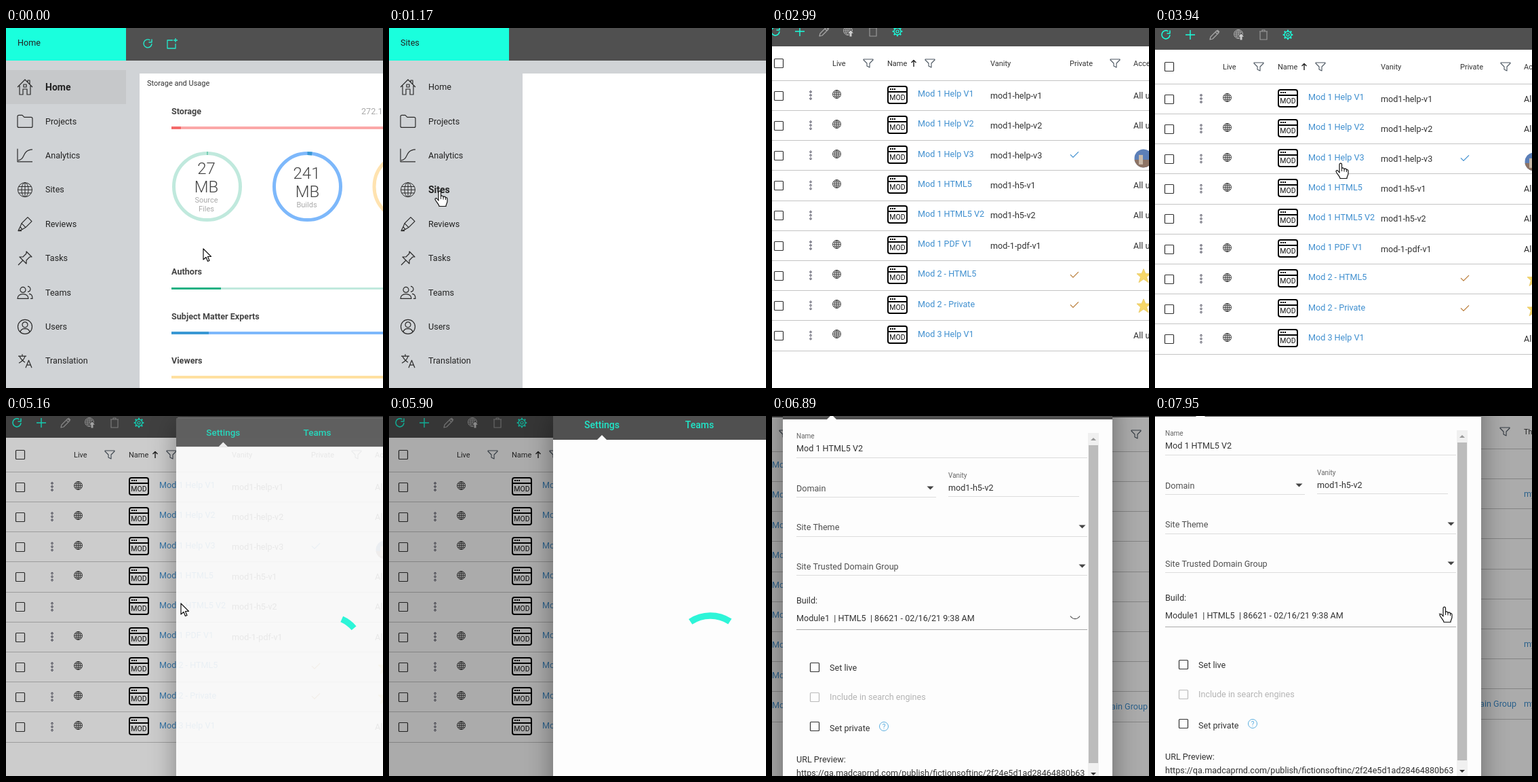
An HTML page with a canvas that plays this animation: 556 px wide and 530 px high, repeating every 8000 ms.

```html
<!DOCTYPE html>
<html lang="en">
<head>
<meta charset="utf-8">
<title>Site management</title>
<style>
html, body { margin: 0; width: 100%; height: 100%; overflow: hidden; background: #fff; }
canvas { display: block; }
</style>
</head>
<body>
<canvas id="stage" width="556" height="530"></canvas>
<script>
const ctx = document.getElementById('stage').getContext('2d');
const W = 556, H = 530, LOOP = 8000, TAU = Math.PI * 2;
const TEAL = '#1affdd', BAR = '#505050', INK = '#333', LINK = '#3f8fcf';

// The screen only refreshes at these times (ms).
const STEPS = [0, 130, 260, 410, 530, 650, 780, 900, 1050, 1170, 1290, 1440, 1570, 1700,
  1820, 1950, 2470, 2600, 2730, 2870, 2990, 3130, 3250, 3400, 3550, 3800, 3940, 4070,
  4190, 4320, 4450, 4570, 4890, 5160, 5280, 5420, 5540, 5660, 5780, 5900, 6020, 6170,
  6390, 6530, 6650, 6770, 6890, 7010, 7540, 7700, 7820, 7950];

const CAMERA = [[2470, 0, 0], [2730, 130, 51], [2870, 190, 74], [2990, 215, 84],
  [3130, 211, 82], [3550, 204, 79], [6390, 204, 79], [6530, 268, 84], [6650, 334, 91],
  [6770, 390, 101], [6890, 430, 109], [7010, 451, 113]];

const POINTER = [[0, 291, 325], [260, 217, 291], [900, 75, 240], [1290, 75, 240],
  [1950, 277, -17], [2600, 277, -17], [3800, 279, 101], [3940, 274, 199], [4070, 284, 250],
  [4190, 262, 305], [4320, 215, 300], [4450, 240, 282], [4570, 258, 275], [4890, 258, 276],
  [5420, 258, 276], [7540, 423, 139], [7700, 427, 190], [7820, 431, 245], [7950, 427, 281]];

function at(keys, t) {
  let i = keys.findIndex(k => k[0] > t);
  if (i < 0) return keys[keys.length - 1].slice(1);
  if (i === 0) return keys[0].slice(1);
  const a = keys[i - 1], b = keys[i], u = (t - a[0]) / (b[0] - a[0]);
  return [a[1] + (b[1] - a[1]) * u, a[2] + (b[2] - a[2]) * u];
}

function rect(x, y, w, h, color) {
  ctx.fillStyle = color;
  ctx.fillRect(x, y, w, h);
}

// y is the visual middle of the line; the baseline snaps to whole pixels.
function text(str, x, y, { size = 12.6, color = INK, weight = 400, align = 'left' } = {}) {
  ctx.font = `${weight} ${size}px Roboto, sans-serif`;
  ctx.fillStyle = color;
  ctx.textAlign = align;
  ctx.fillText(str, x, Math.round(y + size * 0.355 - 0.8));
}

function icon(d, x, y, color = '#2b2b2b', width = 1.2, fill) {
  ctx.save();
  ctx.translate(x, y);
  const path = new Path2D(d);
  if (fill) { ctx.fillStyle = fill; ctx.fill(path); }
  ctx.strokeStyle = color;
  ctx.lineWidth = width;
  ctx.lineJoin = 'round';
  if (width) ctx.stroke(path);
  ctx.restore();
}

function ring(x, y, r, color, width, from = 0, sweep = TAU) {
  ctx.beginPath();
  ctx.arc(x, y, r, from, from + sweep);
  ctx.strokeStyle = color;
  ctx.lineWidth = width;
  ctx.stroke();
}

function globe(x, y, r, color, width) {
  ring(x, y, r, color, width);
  ctx.beginPath();
  ctx.ellipse(x, y, r * 0.48, r, 0, 0, TAU);
  for (const k of [-0.45, 0, 0.45]) {
    const half = r * Math.sqrt(1 - k * k);
    ctx.moveTo(x - half, y + k * r);
    ctx.lineTo(x + half, y + k * r);
  }
  ctx.moveTo(x, y - r);
  ctx.lineTo(x, y + r);
  ctx.stroke();
}

function checkbox(x, y, color = '#333') {
  ctx.strokeStyle = color;
  ctx.lineWidth = 1.2;
  ctx.beginPath();
  ctx.roundRect(x - 6.5, Math.round(y) - 6.5, 13, 13, 1);
  ctx.stroke();
}

const SHAPES = {
  home: 'M-11 0L0-11 11 0M-8-2V11H-3V3H3V11H8V-2M4-7V-10H7V-4M-2-4H2V0H-2Z',
  folder: 'M-11-7a2 2 0 0 1 2-2H-4l3 3H9a2 2 0 0 1 2 2V7a2 2 0 0 1-2 2H-9a2 2 0 0 1-2-2Z',
  chart: 'M-11-10V9H11M-10 7C1 6-5-8 11-9',
  pen: 'M-10 10L-7 4-5-1 4-10 10-4 1 5-4 8ZM-5-1L1 5M-7 4L-4 8M-10 10H-5',
  pin: 'M2-10L10-2 7-2 2 3 2 8-8-2-3-2 2-7ZM-3 3L-10 10',
  people: 'M-7-4a4 4 0 1 0 8 0a4 4 0 1 0-8 0M-11 9C-11 0 5 0 5 9ZM4-9a4 4 0 1 1 0 8M6 2C10 2 11 5 11 9H8',
  user: 'M-10.5 0a10.5 10.5 0 1 0 21 0a10.5 10.5 0 1 0-21 0M-4-3a4 4 0 1 0 8 0a4 4 0 1 0-8 0M-7 8C-6 1 6 1 7 8',
  translate: 'M-10-7H2M-4-10V-7M0-7C-1-2-5 1-9 3M-8-7C-6-2-3 0 0 2M1 10L5.5-1 10 10M2.5 6H8.5',
  refresh: 'M6 0A6 6 0 1 1 3.5-5M6-6.5V-2H1.5',
  plus: 'M-7 0H7M0-7V7',
  boxPlus: 'M1-5H-7V7H5V0M5-8V-2M2-5H8',
  pencil: 'M-7 7L-6 3 3-6 6-3-3 6ZM1-4L4-1M4-7L7-4',
  trash: 'M-6-5H6M-2-5V-7H2V-5M-5-5V7H5V-5',
  filter: 'M-7-6H7V-5L2 0V6L-2 4V0L-7-5Z',
  up: 'M0 5V-4M-3.5-1L0-4.5 3.5-1',
  check: 'M-6 0L-2 4 6-4',
  star: 'M0-10L3-3 10-3 4.5 2 7 10 0 5-7 10-4.5 2-10-3-3-3Z',
  caret: 'M-5-2.5H5L0 2.5Z',
  chevron: 'M-7-2.5C-3 3 3 3 7-2.5',
  arrow: 'M0 0V16L4 12.5 6.5 18.5 9 17.5 6.5 11.5H11.5Z',
  hand: 'M-2 2C-2-.5 1.5-.5 1.5 2V8C2 6.5 5 6.5 5 9C6 7.5 8.5 8 8.5 10C9.5 9 11 9.5 11 12V15C11 18 9 19 9 22.5H-1C-1 20-7 14-7 12C-7 10.5-5 10-4 11.5L-2 14Z'
};

const MENU = [['Home', 'home'], ['Projects', 'folder'], ['Analytics', 'chart'], ['Sites'],
  ['Reviews', 'pen'], ['Tasks', 'pin'], ['Teams', 'people'], ['Users', 'user'],
  ['Translation', 'translate']];

function sidebar(active) {
  rect(0, 0, 177, 48, TEAL);
  text(active, 17, 22.5, { color: '#222' });
  if (active === 'Home') rect(0, 62, 177, 50, '#c6c8ca');
  MENU.forEach(([name, shape], i) => {
    const y = 87 + i * 50.4, on = name === active;
    if (shape) icon(SHAPES[shape], 28, y);
    else globe(28, y, 10.5, '#2b2b2b', 1);
    text(name, 58, y + 0.5, { color: '#222', weight: on ? 700 : 400, size: on ? 14 : 12.6 });
  });
}

function meter(label, y, barY, h, base, tone, part) {
  text(label, 244, y, { weight: 700, color: '#444' });
  rect(244, barY, 400, h, base);
  rect(244, barY, part, h, tone);
}

function dial(x, lines, caption, base, tone, sweep) {
  const y = 233.5;
  ring(x, y, 49, base, 5);
  ring(x, y, 49, tone, 5, -TAU / 4, sweep);
  const top = caption.length > 1 ? 207 : 214;
  lines.forEach((s, i) => text(s, x - 1 + (caption.length > 1 ? 0 : i), top + i * 27,
    { size: 24, weight: 300, color: '#444', align: 'center' }));
  caption.forEach((s, i) => text(s, x - 1, top + 47 + i * 13,
    { size: 11, color: '#aaa', align: 'center' }));
}

function dashboard() {
  text('Storage and Usage', 208, 81.5, { size: 11 });
  text('272.1 MB', 524, 123.5, { color: '#aaa' });
  meter('Storage', 123.5, 145, 4, '#fba8a8', '#f46a6a', 14);
  dial(296.5, ['27', 'MB'], ['Source', 'Files'], '#c0e9dd', '#2db58a', 0.02);
  dial(444.5, ['241', 'MB'], ['Builds'], '#7db8fb', '#3a98d4', 0.14);
  ring(592, 233.5, 49, '#ffe3b0', 5);
  meter('Authors', 359.5, 382, 3, '#c0e9dd', '#1fb183', 73);
  meter('Subject Matter Experts', 425.5, 447, 4, '#7db8fb', '#3a98d4', 55);
  meter('Viewers', 490.5, 512, 4, '#ffe0a0', '#ffe0a0', 0);
}

function siteTabs() {
  rect(191, 0, 61, 48, '#404040');
  [['Sites', 221.5], ['URLs', 282], ['Security', 352], ['Themes', 430]].forEach(([s, x]) =>
    text(s, x, 23.5, { weight: 500, color: '#23ecce', align: 'center' }));
  rect(207, 29, 29, 1, '#23ecce');
  icon('M-8 4L0-4 8 4Z', 221.5, 44, '', 0, '#d0d3d6');
}

function gear(x, y) {
  ring(x, y, 2, TEAL, 1.2);
  ring(x, y, 5, TEAL, 1.3);
  for (let i = 0; i < 8; i++) ring(x, y, 6.3, TEAL, 2, i * TAU / 8 - 0.16, 0.32);
}

function toolbar() {
  ctx.fillStyle = BAR;
  ctx.beginPath();
  ctx.roundRect(197, 67, 900, 44, [3, 0, 0, 0]);
  ctx.fill();
  icon(SHAPES.refresh, 220, 89, TEAL, 1.5);
  icon(SHAPES.plus, 256, 89, TEAL, 1.4);
  icon(SHAPES.pencil, 292, 89, '#aaa');
  globe(327, 88, 6.5, '#aaa', 1);
  icon('M0-5L5 0H2V5H-2V0H-5Z', 331, 92, BAR, 1, '#ccc');
  icon(SHAPES.trash, 364, 89, '#999');
  gear(400, 89);
}

const ROWS = [
  ['Mod 1 Help V1', 'mod1-help-v1'], ['Mod 1 Help V2', 'mod1-help-v2'],
  ['Mod 1 Help V3', 'mod1-help-v3'], ['Mod 1 HTML5', 'mod1-h5-v1'],
  ['Mod 1 HTML5 V2', 'mod1-h5-v2'], ['Mod 1 PDF V1', 'mod-1-pdf-v1'],
  ['Mod 2 - HTML5', ''], ['Mod 2 - Private', ''], ['Mod 3 Help V1', '']];

function modIcon(x, y) {
  ctx.strokeStyle = '#000';
  ctx.lineWidth = 2;
  ctx.beginPath();
  ctx.roundRect(x + 1, y + 1, 28, 25, 3);
  ctx.moveTo(x + 1, y + 9);
  ctx.lineTo(x + 29, y + 9);
  ctx.stroke();
  for (const dx of [4, 7, 10]) rect(x + dx, y + 4, 2, 2, '#000');
  text('MOD', x + 15, y + 18, { size: 10.5, color: '#111', align: 'center' });
}

function avatar(x, y) {
  ctx.save();
  ctx.beginPath();
  ctx.arc(x, y, 13.5, 0, TAU);
  ctx.clip();
  rect(x - 14, y - 14, 28, 28, '#5c7fb8');
  rect(x - 14, y + 2, 28, 12, '#8d7364');
  rect(x - 7, y - 5, 6, 14, '#c9b9a8');
  ctx.restore();
}

function row([name, vanity], i) {
  const y = 183.5 + i * 44.2;
  rect(197, Math.round(205 + i * 44.2), 900, 1, '#c4c4c4');
  checkbox(225, y);
  for (const dy of [-5, 0, 5]) ring(272, y - 0.5 + dy, 1.3, '#445', 1);
  if (i !== 4) globe(310.5, Math.round(y) - 2.5, 6, '#333', 0.9);
  modIcon(385, Math.round(y - 15));
  text(name, 430, y - 2, { color: LINK });
  text(vanity, 537, y + 0.5);
  if (i === 2) icon(SHAPES.check, 661, y - 1.5, '#3f8fcf');
  if (i === 6 || i === 7) {
    icon(SHAPES.check, 661, y - 1.5, '#b87a35');
    icon(SHAPES.star, 763, y, '#e8c860', 0.8, '#f7d768');
  } else if (i === 2) avatar(763, y + 4);
  else text('All users', 748, y + 0.5);
  if (i === 1 || i === 6 || i === 8) text('my-theme', 995, y + 0.5, { color: LINK });
  if (i === 8) text('Domain Group', 984, y + 0.5, { color: LINK, align: 'right' });
}

function table() {
  const head = { size: 11, color: '#333' };
  checkbox(225, 136);
  [['Live', 304], ['Name', 385], ['Vanity', 537], ['Private', 654], ['Access', 748],
    ['Theme', 995]].forEach(([s, x]) => text(s, x, 136.5, head));
  for (const x of [357, 448, 721, 967]) icon(SHAPES.filter, x, 136, '#4a5560', 1.1);
  icon(SHAPES.up, 424, 136, '#222', 1.4);
  rect(197, 161, 900, 1, '#c4c4c4');
  ROWS.forEach(row);
}

function page(t) {
  rect(0, 0, 1100, 900, '#d0d3d6');
  rect(177, 0, 923, 48, BAR);
  sidebar(t < 1050 ? 'Home' : 'Sites');
  rect(197, 67, 903, 833, '#fff');
  if (t < 1170) {
    icon(SHAPES.refresh, 209, 23, '#23ecce', 1.4);
    icon(SHAPES.boxPlus, 245, 23, '#23ecce', 1.3);
    dashboard();
  }
  if (t >= 1440) { siteTabs(); toolbar(); }
  if (t >= 1570) table();
}

const line = (x, y, w, color = '#dcdcdc') => rect(x, y, w, 1, color);
const caret = (x, y) => icon(SHAPES.caret, x, y, '', 0, '#444');

function form() {
  const small = { size: 10, color: '#666' }, soft = { color: '#505050' };
  text('Name', 132, 48.5, small);
  text('Mod 1 HTML5 V2', 132, 66);
  line(132, 79, 429);
  text('Domain', 132, 125, soft);
  caret(329.5, 124);
  line(132, 137, 206);
  text('Vanity', 356, 106.5, small);
  text('mod1-h5-v2', 356, 124);
  line(356, 136, 193);
  text('Site Theme', 132, 182, soft);
  caret(553.5, 181);
  line(132, 195, 429);
  text('Site Trusted Domain Group', 132, 240, soft);
  caret(553.5, 239);
  line(132, 252, 429);
  text('Build:', 132, 290);
  text('Module1\u00a0 | HTML5\u00a0 | 86621 - 02/16/21 9:38 AM', 132, 316);
  icon(SHAPES.chevron, 543, 315, '#444', 1.1);
  line(132, 332, 429, '#aaa');
  checkbox(159, 388);
  text('Set live', 181, 389);
  checkbox(159, 432, '#bbb');
  text('Include in search engines', 181, 432, { color: '#b4b4b4' });
  checkbox(159, 475);
  text('Set private', 181, 478);
  ring(261, 475, 6.5, '#5aaee0', 1);
  text('?', 261, 476, { size: 10, color: '#5aaee0', align: 'center' });
  text('URL Preview:', 132, 524);
  text('https://qa.madcaprnd.com/publish/fictionsoftinc/2f24e5d1ad28464880b63', 132, 544);
  rect(562, 43, 16, 520, '#f0f0f0');
  rect(563, 61, 14, 468, '#bcbcbc');
  icon('M-4 2L0-2 4 2Z', 570, 52, '', 0, '#999');
  icon('M-4-2L0 2 4-2Z', 570, 545, '', 0, '#333');
}

// The shadow is clipped to the outside, so it never shows through the panel.
function panel(x, y, w, h) {
  const box = new Path2D(), outside = new Path2D();
  box.roundRect(x, y, w, h, 3);
  outside.rect(-100, -100, 1300, 1100);
  outside.addPath(box);
  ctx.save();
  ctx.clip(outside, 'evenodd');
  ctx.shadowColor = 'rgba(0,0,0,.4)';
  ctx.shadowBlur = 38;
  ctx.shadowOffsetY = 10;
  ctx.fillStyle = '#fdfdfd';
  ctx.fill(box);
  ctx.restore();
  ctx.fillStyle = '#fdfdfd';
  ctx.fill(box);
  rect(x, y, w, 44, BAR);
}

function dialog(t) {
  const opening = t < 5280, scale = opening ? 0.963 : 1;
  rect(0, 0, 1100, 900, `rgba(0,0,0,${opening ? 0.2 : 0.33})`);
  ctx.save();
  ctx.translate(689, 389);
  ctx.scale(scale, scale);
  ctx.translate(-689, -389);
  ctx.globalAlpha = opening ? 0.9 : 1;
  panel(446, 70, 486, 638);
  const tab = { size: 14, weight: 500, color: '#20e6c8', align: 'center' };
  text('Settings', 518, 92.5, tab);
  text('Teams', 662, 92.5, tab);
  icon('M-7 3.5L0-3.5 7 3.5Z', 518, 110.5, '', 0, '#fdfdfd');
  if (t < 6390) {
    const p = (t - 5160) / 1010, grow = 0.44 + 0.65 * (1 - Math.cos(p * TAU));
    ctx.globalAlpha = 1;
    ring(678, 426, 53, '#2df5d8', 9.5, -1.15 + p * 7.2, grow);
  } else {
    ctx.translate(334, 91);
    form();
  }
  ctx.restore();
}

function pointer(t) {
  if ((t >= 2600 && t < 3800) || (t >= 5420 && t < 7540)) return;
  const [x, y] = at(POINTER, t);
  const hand = (t >= 530 && t < 1440) || (t >= 3800 && t < 4890) || t >= 7540;
  icon(hand ? SHAPES.hand : SHAPES.arrow, x, y, '#111', 1.2, '#fff');
  if (hand) icon('M1.5 8V12M5 9V12.5M8.5 10V13', x, y, '#111', 1);
}

function draw(now) {
  const clock = now % LOOP;
  const t = STEPS.filter(s => s <= clock).pop();
  const [cx, cy] = at(CAMERA, t);
  ctx.clearRect(0, 0, W, H);
  ctx.save();
  ctx.translate(-Math.round(cx), -Math.round(cy));
  page(t);
  if (t >= 5160) dialog(t);
  ctx.restore();
  pointer(t);
}

const start = performance.now();
function tick() {
  draw(performance.now() - start);
  requestAnimationFrame(tick);
}
tick();
</script>
</body>
</html>
```
